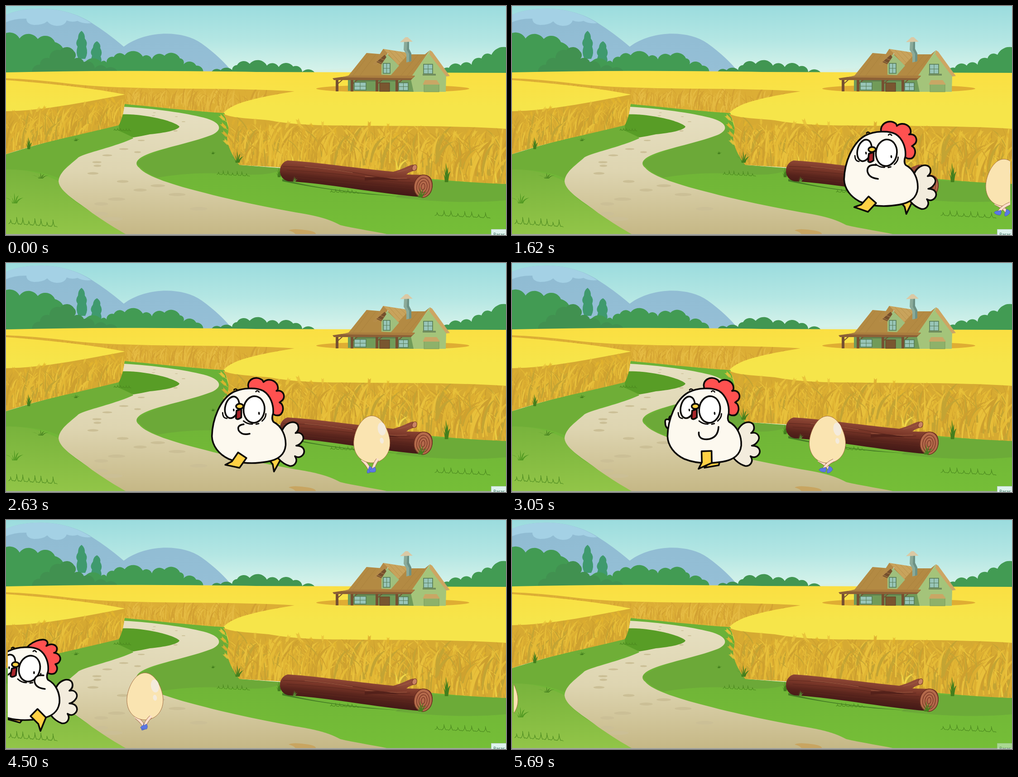
Animation of 1104x507 px, one loop 5.76 s. Source, as an HTML page:

```html
<!DOCTYPE html>
<html lang="es">
<head>
<meta charset="utf-8">
<title>Granja</title>
<style>
  html, body { margin: 0; width: 100%; height: 100%; overflow: hidden; }
  svg { display: block; width: 100vw; height: 100vh; }
</style>
</head>
<body>
<svg id="stage" viewBox="0 0 1104 507" preserveAspectRatio="none"></svg>
<script>
const stage = document.getElementById('stage');

// ---------- drawing helpers ----------
let seed = 7;
const rnd = (a = 0, b = 1) => {
  seed = (seed * 1664525 + 1013904223) >>> 0;
  return a + (b - a) * seed / 4294967296;
};
const pick = list => list[Math.floor(rnd(0, list.length))];
const repeat = (n, make) => Array.from({ length: n }, (_, i) => make(i)).join('');
const path = (d, fill, extra = '') => `<path d="${d}" fill="${fill}" ${extra}/>`;
const line = (d, stroke, width = 1, extra = '') =>
  `<path d="${d}" fill="none" stroke="${stroke}" stroke-width="${width}" stroke-linecap="round" stroke-linejoin="round" ${extra}/>`;
const oval = (x, y, rx, ry, fill, extra = '') =>
  `<ellipse cx="${x}" cy="${y}" rx="${rx}" ry="${ry}" fill="${fill}" ${extra}/>`;
const box = (x, y, w, h, fill, extra = '') =>
  `<rect x="${x}" y="${y}" width="${w}" height="${h}" fill="${fill}" ${extra}/>`;
const poly = (points, fill) => `<polygon points="${points}" fill="${fill}"/>`;
const gradient = (id, stops, axis = 'x2="0" y2="1"') =>
  `<linearGradient id="${id}" ${axis}>${stops.map((c, i) =>
    `<stop offset="${i / (stops.length - 1)}" stop-color="${c}"/>`).join('')}</linearGradient>`;
const clip = (id, shape) => `<clipPath id="${id}">${shape}</clipPath>`;

// Leafy silhouette: shallow arcs between neighbouring notches.
function bush(notches, fill) {
  const p = notches.split(' ').map(s => s.split(',').map(Number));
  let d = `M${p[0]}`;
  for (let i = 1; i < p.length; i++) {
    const r = Math.hypot(p[i][0] - p[i - 1][0], p[i][1] - p[i - 1][1]) * .6;
    d += `A${r} ${r} 0 0 1 ${p[i]}`;
  }
  return path(`${d}L${p.at(-1)[0]} 150H${p[0][0]}Z`, fill, 'transform="translate(0 4)"');
}

function blade(x, y, lean, h, w) {
  return `M${x} ${y}Q${x + lean * .05} ${y - h * .8} ${x + lean} ${y - h}Q${x + lean * .2 + w} ${y - h * .7} ${x + w} ${y}Z`;
}

function wheat(count, x0, x1, top, bottom, colors, region) {
  return `<g clip-path="url(#${region})">${repeat(count, () => {
    const x = rnd(x0, x1), base = bottom(x), h = base - top(x);
    return path(blade(x, base - rnd(-.05, .35) * h, rnd(-.4, .4) * h, h * rnd(.35, .75), rnd(.012, .03) * h + 1), pick(colors));
  })}</g>`;
}

function ear(x, y, size, turn) {
  const s = size * .32;
  const grains = repeat(6, i => {
    const y0 = (2 - i) * size / 4;
    return `M${-s} ${y0 - s * 1.5}L0 ${y0}L${s} ${y0 - s * 1.5}`;
  });
  return line(`M0 ${size}V${-size}${grains}`, pick(['#e3b52e', '#ddae31', '#e8c23b']), size * .12,
    `transform="translate(${x} ${y}) rotate(${turn})"`);
}

const tuft = (x, y, w, h, color = '#437f1d') => path(repeat(5, i => {
  const lean = i / 2 - 1;
  return blade(x + lean * w * .12, y, lean * w * .45, h * (1 - Math.abs(lean) * .45), 1 + h * .05);
}), color);

function scribble(x, y, w, h, n) {
  const s = w / n;
  return line(`M${x} ${y}` + repeat(n, i => {
    const up = h * (i % 3 ? 1 : .6);
    return `q${s * .4} ${-up * .3} ${s * .3} ${-up}q${s * .1} ${up * .7} ${s * .3} ${up}q${s * .2} ${-up * .1} ${s * .4} ${h * .06}`;
  }), '#4c8a1f', 1.1);
}

// ---------- scenery ----------
const road = 'M258 223C330 227 396 237 436 247C478 258 480 276 450 287C410 302 350 314 318 326C290 336 281 348 294 358C310 378 372 397 440 414C500 430 570 444 640 457C700 466 720 476 738 485C770 493 815 499 850 507H268C240 492 215 475 190 458C160 434 118 412 116 388C118 366 142 352 160 335C180 324 240 312 281 293L250 240Z';
const rightWheat = 'M478 238C500 249 540 249 580 253C650 266 720 264 780 265S980 264 1104 272V394C1020 391 980 386 930 382L600 357L515 352Q490 318 488 292Q498 262 478 238Z';
const leftWheat = 'M0 233C70 232 140 220 263 196Q262 240 249 264Q200 276 130 292T0 328Z';
const backWheat = 'M0 160Q60 162 140 172T400 183T637 189C570 200 500 212 480 237C400 232 330 223 262 217V196C200 182 70 169 0 164Z';

function trees() {
  return bush('-12,64 30,68 70,69 108,76 124,120 130,150', '#429b53')
    + path('M167 55Q175 62 174 72Q181 80 177 90Q182 104 175 117H160Q153 104 158 90Q152 82 159 72Q159 60 167 55Z', '#3f9a6e')
    + path('M201 78Q210 84 208 93Q214 103 209 112Q214 124 205 132H192Q185 122 190 110Q184 102 192 92Q193 81 201 78Z', '#3f9a6e')
    + bush('152,146 172,124 210,120 222,121 238,109 262,105 302,108 322,114 350,106 384,112 392,125 420,128 435,146', '#429b53')
    + bush('58,146 75,126 96,112 120,94 150,96 148,115 172,120 196,134 222,134 248,146', '#419150')
    + bush('452,146 474,138 503,143', '#3f9150')
    + bush('500,142 510,127 538,124 576,128 602,131 634,130 654,142 684,147', '#419652')
    + bush('960,147 978,133 1004,128 1028,126 1050,112 1072,104 1120,96', '#429b53');
}

function house() {
  const glass = (x, y, w, h) => box(x, y, w, h, '#98c5b8', 'stroke="#567b55" stroke-width="1.6"')
    + line(`M${x + w / 2} ${y}v${h}M${x} ${y + h / 2}h${w}`, '#567b55');
  const post = x => box(x, 162, 6, 27, '#765031') + line(`M${x + 6} 171l8-7`, '#765031', 2);
  const slats = (n, x, gap, lean) => line(repeat(n, i => `M${x + i * gap} 154l${lean} -46`), '#a87f3c', .8);
  return oval(854, 183, 169, 8, '#dfad33')
    + path('M720 190H1000L980 195H740Z', '#f6e44a')
    + poly('755,160 902,157 902,190 755,188', '#719b59')
    + poly('893,158 936,99 972,153 971,190 900,190', '#a4c47a')
    + poly('753,158 796,104 833,107 925,107 936,98 894,158', '#b38a43')
    + slats(2, 766, 15, 35) + slats(2, 872, 14, 38)
    + poly('936,98 941,101 980,155 972,156 935,107', '#cda663')
    + poly('829,152 829,122 841,106 868,132 850,153', '#9fbf7d')
    + poly('833,95 891,104 866,131 842,104 817,131 811,129', '#c8a35c')
    + poly('833,95 843,105 817,131 811,129', '#b48a47')
    + poly('818,124 836,108 840,113 829,129', '#76502d')
    + line('M820 122l11 5M826 116l10 4', '#b58b52')
    + line(repeat(3, i => `M${846 + i * 12} ${98 + i * 1.5}l${24 - i * 5} ${27 - i * 7}`), '#b18c47', .8)
    + glass(833, 127, 15, 22)
    + path('M879 79H890V95L895 105V122L884 125V107L878 97Z', '#8aaa99')
    + path('M886 79H890V95L895 105V122L890 124V106L885 97Z', '#6d9184')
    + poly('870,80 882,69 887,69 898,79', '#dac9a5')
    + box(770, 162, 90, 5, '#5f7f4c') + repeat(4, i => post(728 + i * 44 - (i == 1) * 11))
    + poly('721,160 756,155 903,155 894,164 724,164', '#8c6036')
    + poly('740,158 756,154 903,154 897,160', '#aa7e3f')
    + glass(769, 169, 26, 17) + glass(867, 170, 21, 17)
    + box(825, 170, 22, 19, '#795630', 'stroke="#593e29"')
    + glass(922, 129, 20, 21) + box(920, 150, 29, 4, '#718e5d')
    + box(923, 173, 33, 17, '#8eb16a', 'stroke="#78975b"')
    + poly('925,164 951,164 958,174 920,174', '#c9a765');
}

function log() {
  const rings = repeat(3, i => oval(921, 400, 14 - i * 5, 19 - i * 6, 'none', 'stroke="#7a3726" stroke-width="1.4" transform="rotate(8 921 399)"'));
  return path('M610 383Q700 410 905 424L800 417Q690 405 610 388Z', '#457b25')
    + path('M622 342C680 345 780 360 855 367C878 361 886 354 899 351L907 363Q890 367 884 373L925 374Q942 375 942 398Q939 420 918 423C810 414 720 394 623 388C597 381 601 347 622 342Z', 'url(#bark)')
    + line(repeat(4, i => `M${612 + i * 8} ${355 + i * 8}q110 ${4 + i * 3} 180 18t100 10`), '#5b271d', 1.2)
    + line('M660 356Q720 361 765 369M793 377Q840 383 885 381M864 368Q884 364 897 357', '#a05d44')
    + path('M792 380Q830 376 868 386Q822 383 792 387Z', '#54211a')
    + oval(902, 358, 5, 7, '#c98363', 'stroke="#713823" transform="rotate(20 902 358)"')
    + oval(921, 399, 20, 25, '#b46a4b', 'stroke="#6b2d20" stroke-width="1.5" transform="rotate(8 921 399)"') + rings;
}

function scenery() {
  const straw = ['#e1b534', '#cfa22f', '#e5bb36', '#cda02f', '#dcae31', '#e8c03b', '#c3a434'];
  const rightTop = x => 246 + (x - 480) * .04, rightBottom = x => 350 + (x - 510) * .075;
  const leftTop = x => 236 - x * .14, leftBottom = x => 328 - x * .26;
  const stones = repeat(42, i => {
    const y = 236 + i * i * .14, size = (y - 195) / 13;
    return oval(rnd(150, 440), y, size * rnd(.7, 1.1), size * .2, '#cbbf96');
  });
  const ears = repeat(34, i => {
    const x = 492 + i * 18 + rnd(0, 12);
    return ear(x, rightTop(x) + rnd(8, 30), rnd(6, 10), rnd(-40, 40));
  }) + repeat(20, i => ear(4 + i * 13, leftTop(4 + i * 13) + rnd(4, 18), rnd(5, 8), rnd(-35, 45)))
    + repeat(4, i => ear(480 + i * 3, 250 + i * 18, 9, -45));

  return box(0, 0, 1104, 150, 'url(#sky)')
    + path('M0 20C40 0 130 -3 190 38Q225 60 260 90C310 53 390 53 432 83C462 105 482 124 500 146H0Z', 'url(#hill)')
    + path('M0 20C40 0 130 -3 188 38Q170 40 158 33Q146 37 134 32Q130 44 112 44Q98 43 91 34Q82 42 62 42Q45 40 45 28Q20 27 0 36Z', '#a4d1e5')
    + path('M640 147Q760 130 960 140V150H640Z', '#d5f0e6') + trees()
    + path('M0 147Q270 141 552 146L1104 148V300H0Z', 'url(#field)')
    + path('M0 330Q90 300 249 264L262 216Q370 226 482 237L515 352L1104 394V507H0Z', 'url(#grass)')
    + path('M0 328Q120 290 250 262L290 288Q210 313 162 333Q130 350 118 382Q70 360 0 363Z', '#6fae37')
    + path('M0 362Q60 360 116 388Q120 410 160 438L268 507H0Z', 'url(#meadow)')
    + path('M288 347Q300 328 455 286Q486 270 472 246L515 352L610 360Q590 378 500 372T335 380Q305 370 288 347Z', '#6ca938')
    + path('M900 384L1104 394V430Q1000 440 860 424Z', '#6cab38')
    + path('M262 217Q370 226 482 237Q486 250 470 262Q445 244 262 224Z', '#6ab238')
    + path(road, 'url(#road)') + `<g clip-path="url(#lane)">${stones}</g>`
    + path('M624 497Q632 492 660 496Q686 499 684 506H640Q636 500 624 497Z', '#c8a561')
    + path('M250 240C310 238 374 256 383 267C380 275 350 281 318 284Q300 288 281 291L249 276Z', '#589d26')
    + path(backWheat, '#dcae35')
    + wheat(230, 262, 600, () => 177, x => 221 + (x - 262) * .07, ['#e5bb43', '#d2a132', '#e1b53c'], 'backField')
    + wheat(60, 10, 262, x => 155 + x * .08, x => 176 + x * .08, ['#d4a332', '#e1b53c'], 'backField')
    + path(leftWheat, '#d6a931') + wheat(260, -5, 262, leftTop, leftBottom, straw, 'leftField')
    + path(rightWheat, '#d6aa32') + wheat(640, 488, 1108, rightTop, rightBottom, straw, 'rightField')
    + ears
    + path(blade(632, 343, -17, 27, 3) + blade(862, 362, -22, 48, 4) + blade(866, 363, 24, 24, 3) + blade(1081, 391, -20, 59, 3), '#f0d747')
    + house()
    + tuft(49, 317, 14, 27) + tuft(76, 382, 32, 13) + tuft(153, 299, 18, 8) + tuft(456, 328, 12, 7)
    + tuft(510, 347, 26, 26) + tuft(602, 379, 16, 22) + tuft(971, 390, 18, 43) + tuft(18, 437, 36, 23, '#529a22')
    + scribble(6, 482, 107, 15, 8) + scribble(238, 275, 38, 5, 6) + scribble(466, 373, 72, 9, 7)
    + scribble(947, 464, 122, 12, 8) + log() + scribble(716, 412, 63, 7, 7)
    + tuft(914, 424, 28, 24) + tuft(636, 389, 14, 12, '#55812e')
    + box(0, 505, 1104, 2, '#a2a5a3');
}

// ---------- characters ----------
const INK = 'stroke="#0b0908" stroke-width="3.6" stroke-linejoin="round" stroke-linecap="round"';
const foot = id => `<g id="${id}">${path('M48 423L69 430L60 455L28 457L40 446Z', '#ffd144', INK)}</g>`;

const comb = {
  down: 'M84 290C99 267 126 261 133 267Q139 272 133 279C145 271 160 277 156 289Q154 294 150 294C162 295 168 306 161 315Q157 319 153 319C161 328 156 341 145 341Q137 341 132 334L120 290Z',
  up: 'M86 284C77 266 99 251 116 264Q117 266 118 268C132 256 153 268 149 284Q148 286 146 287C163 283 167 303 156 309Q154 311 152 312C164 317 160 341 146 340Q139 340 135 335L120 290Z'
};
const arm = {
  mouth: 'M72 354Q52 352 52 367Q54 382 75 384',
  low: 'M68 377Q66 392 85 392Q110 390 112 365'
};

const chicken = `<g id="chicken">
  ${foot('farFoot')}
  <g id="farArm">${path('M10 342Q2 334 1 347Q-9 343 -7 355Q-7 367 8 371Z', '#fdf9ef', INK)}</g>
  <g id="tail">${path('M152 378C160 352 184 348 190 360Q194 371 184 378C199 375 206 389 196 399Q191 405 184 406C204 407 205 424 194 430Q187 434 180 429C187 440 179 452 167 450Q153 445 143 432Z', '#f3ecdd', INK)}</g>
  <g id="torso">
    <path id="comb" fill="#ff5150" ${INK}/>
    ${path('M0 385C2 350 20 306 50 290C70 280 102 279 117 287C133 297 139 318 137 335Q132 348 137 354C155 363 164 385 162 405C159 426 144 436 120 440C90 445 60 444 35 434C14 424 0 406 0 385Z', '#fdf9ef', INK)}
    <g id="face">
      ${oval(48, 321, 15, 24, '#fff', `${INK} transform="rotate(22 48 321)"`)}
      ${oval(96, 329, 23, 29, '#fff', `${INK} transform="rotate(16 96 329)"`)}
      ${oval(51, 327, 1.7, 3, '#0b0908')}${oval(106, 338, 1.8, 3.2, '#0b0908')}
      ${path('M57 329L68 326L66 344Q57 350 54 345Z', '#a9252b', INK)}
      ${oval(65, 320, 8, 5.5, '#ffd144', INK)}
      ${line('M26 331Q25 343 34 344M70 352Q78 360 89 360M97 361L103 360M111 355Q120 349 121 340M56 284Q59 280 63 284M104 291Q107 287 111 292', '#0b0908', 2.8)}
    </g>
    <path id="arm" fill="#fdf9ef" ${INK}/>
  </g>
  ${foot('nearFoot')}
</g>`;

const eggLeg = id => `<path id="${id}Edge" fill="none" stroke="#9e6445" stroke-width="7"/>
  <path id="${id}Skin" fill="none" stroke="#fadfcb" stroke-width="5.4" stroke-linecap="round"/>
  ${path('M4 -6Q8 -1 5 5Q-4 7 -9 3Q-8 -2 -1 -3Z', '#5b78e5', `id="${id}Shoe" stroke="#4157a7" stroke-width=".7"`)}`;

const egg = `<g id="egg">${eggLeg('legA')}
  ${path('M0 -52C24 -52 40 -14 40 8C40 35 22 52 0 52C-22 52 -40 35 -40 8C-40 -14 -24 -52 0 -52Z', '#fae4b1', 'stroke="#a56e43"')}
  ${oval(22, -23, 9, 14.5, '#f4ebdc', 'transform="rotate(-8 22 -23)"')}${oval(22, 3, 4.3, 6.5, '#f4ebdc', 'transform="rotate(-10 22 3)"')}
  ${eggLeg('legB')}</g>`;

stage.innerHTML = `<defs>
  ${gradient('sky', ['#9bdcde', '#b3e6e3', '#d9f4eb'])}${gradient('hill', ['#8fbbd2', '#95bfd6'])}
  ${gradient('field', ['#fbdf42', '#f6e54a', '#f6e54a'])}${gradient('grass', ['#67ad36', '#70b537', '#75be37'])}
  ${gradient('meadow', ['#78b33c', '#92c548'])}${gradient('road', ['#e7e0c2', '#ded5b1', '#c5b785'])}
  ${gradient('bark', ['#924b38', '#793628', '#55221b', '#431916'], 'gradientUnits="userSpaceOnUse" x1="760" y1="352" x2="754.5" y2="407"')}
  ${clip('lane', path(road))}${clip('backField', path(backWheat))}
  ${clip('leftField', path(leftWheat))}${clip('rightField', path(rightWheat))}
  ${clip('window', box(4, 0, 1096, 507))}
</defs>${scenery()}<g id="cast" clip-path="url(#window)">${egg}${chicken}</g>
<g id="button">${box(1071.5, 494.5, 36, 20, '#def3ed', 'stroke="#b9cdc6"')}
<text x="1076" y="510" font-family="'Open Sans', 'Noto Sans', sans-serif" font-size="10" fill="#37695a">Parar</text></g>`;

// ---------- motion ----------
const LOOP = 5760, ENTER = 260, STEP = 67.82, SPEED = 18.55;
const STRIDE = 7.667, WADDLE = 6.8; // steps per gait cycle
const $ = Object.fromEntries([...stage.querySelectorAll('[id]')].map(el => [el.id, el]));
const move = (el, value) => el.setAttribute('transform', value);
const frac = v => v - Math.floor(v);
const clamp = v => Math.min(1, Math.max(0, v));
const mix = (a, b, u) => a + (b - a) * u;
const bump = (v, center, reach) => Math.cos(Math.PI / 2 * Math.min(1, Math.abs(v - center) / reach));

// Blends two path strings that share the same commands.
function mixPath(a, b, u) {
  const goal = b.match(/-?[\d.]+/g);
  let i = 0;
  return a.replace(/-?[\d.]+/g, n => mix(+n, +goal[i++], u));
}

// The foot is carried back with the ground, then lifted and swung forward.
function stepFoot(el, phase, dx, dy) {
  const stance = .43, swing = (phase - stance) / (1 - stance), carry = phase / stance;
  const [x, y, turn] = swing < 0
    ? [65 * carry, 0, -65 * carry ** 3]
    : [65 - 73 * swing, -8 * Math.sin(Math.PI * swing), -65 + 95 * swing];
  move(el, `translate(${x + dx} ${y + dy}) rotate(${turn} 50 440)`);
}

function poseChicken(k) {
  const s = frac((k - 26) / STRIDE);
  const up = clamp(Math.min((s - .5) / .15, (1 - s) / .05));
  const armLow = bump(s, .7, .25), armBack = bump(s, .43, .27);
  move($.chicken, `translate(${735 - SPEED * (k - 18)} 0)`);
  stepFoot($.nearFoot, s, 0, 0);
  stepFoot($.farFoot, frac(s + .5), 20, -6);
  move($.torso, `translate(0 443) skewX(${2 * up}) scale(1 ${1 + .025 * up}) translate(0 -443)`);
  move($.face, `rotate(${-4 * up} 70 340)`);
  move($.tail, `rotate(${-3 * up} 155 405)`);
  move($.farArm, `translate(${26 - 26 * armLow} 0)`);
  move($.arm, `translate(${55 * armBack} ${-10 * armBack})`);
  $.comb.setAttribute('d', mixPath(comb.down, comb.up, up));
  $.arm.setAttribute('d', mixPath(arm.mouth, arm.low, armLow));
}

function poseLeg(name, crossed, apart, spread, turn) {
  const d = mixPath(crossed, apart, spread);
  const [x, y] = d.match(/-?[\d.]+/g).slice(-2);
  $[name + 'Edge'].setAttribute('d', d);
  $[name + 'Skin'].setAttribute('d', d);
  move($[name + 'Shoe'], `translate(${x} ${y}) rotate(${turn})`);
}

function poseEgg(k) {
  const spread = (1 - Math.cos(2 * Math.PI * (k - 18) / WADDLE)) / 2;
  move($.egg, `translate(${1086 - SPEED * (k - 18)} ${391 - 2 * spread})`);
  poseLeg('legA', 'M-18 47Q0 55 7 66', 'M-25 45Q-28 57 -25 69', spread, mix(-45, -25, spread));
  poseLeg('legB', 'M14 46Q-4 53 -12 66', 'M10 43Q21 57 28 70', spread, mix(15, -30, spread));
}

function draw(t) {
  const k = Math.max(-1, Math.floor((t - 400) / STEP + .15));
  $.cast.setAttribute('visibility', t < ENTER ? 'hidden' : 'visible');
  poseChicken(k);
  poseEgg(k);
  $.button.setAttribute('opacity', 1 - .5 * clamp((t - 5550) / 140));
}

const start = performance.now();
function tick() {
  draw((performance.now() - start) % LOOP);
  requestAnimationFrame(tick);
}
tick();
</script>
</body>
</html>
```
